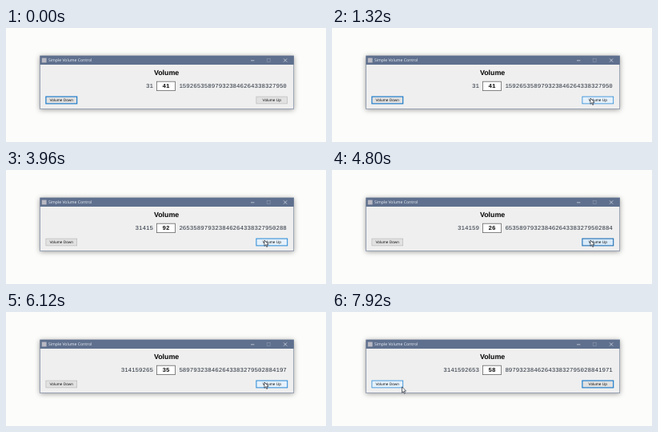
An HTML page that plays this animation: 400x143 px, repeating every 8 s.

```html
<!DOCTYPE html>
<html lang="en">
<head>
<meta charset="utf-8">
<title>Simple Volume Control</title>
<style>
  html, body { margin: 0; width: 100%; height: 100%; overflow: hidden; background: #fcfcfa; }
  svg { display: block; width: 400px; height: 143px; }
  text { text-rendering: geometricPrecision; white-space: pre; }
  .frame { fill: #5f708e; filter: drop-shadow(0 1.5px 3px rgba(0, 0, 0, .38)); }
  .title { font: 5.1px "Open Sans", sans-serif; fill: #eef1f6; }
  .heading { font: bold 8.9px "Liberation Sans", Arial, sans-serif; fill: #050505; text-anchor: middle; }
  .digits { font: 7.48px "Liberation Mono", "Courier New", monospace; fill: #27303c; }
  .value { font-weight: bold; fill: #111; text-anchor: middle; }
  .left { text-anchor: end; }
  .label { font: 4.8px "Liberation Sans", Arial, sans-serif; fill: #151515; text-anchor: middle; }
  .button rect { fill: #e1e1e1; stroke: #b4b4b4; stroke-width: .6; }
  .button.focus rect { stroke: #0f74c8; stroke-width: 1.1; }
  .button.hover rect { fill: #e5f1fb; stroke: #2588d8; stroke-width: .8; }
  .button.focus.hover rect { stroke-width: 1; }
  .button.press rect { fill: #d8eaf9; stroke: #0b62ae; stroke-width: 1; }
  .button.deep rect { fill: #cce4f7; }
  .controls { fill: none; stroke: #e6eaf0; stroke-width: .65; }
</style>
</head>
<body>
<svg viewBox="0 0 400 143">
  <rect class="frame" x="42.3" y="34.6" width="317.6" height="67.2"/>
  <rect x="42.8" y="46" width="316.6" height="55.3" fill="#efefef"/>
  <rect x="44.8" y="37.6" width="5.8" height="5.8" fill="#b9b9c3"/>
  <text class="title" x="53" y="42.3">Simple Volume Control</text>
  <g class="controls">
    <path d="M306 40.8h4.4M347 38.4l4.2 4.2m0-4.2l-4.2 4.2"/>
    <rect x="326.2" y="38.5" width="4" height="4" opacity=".3"/>
  </g>

  <text class="heading" x="200.6" y="58.7">Volume</text>
  <text class="digits left" id="before" x="184" y="74.9"></text>
  <rect x="188.5" y="67.2" width="23" height="11.4" fill="#fff" stroke="#686868" stroke-width=".8"/>
  <text class="digits value" id="value" x="200.1" y="74.9"></text>
  <text class="digits" id="after" x="216.4" y="74.9"></text>

  <g class="button" id="down">
    <rect x="49.9" y="86.1" width="38.8" height="8.8"/>
    <text class="label" x="69.2" y="92.3">Volume Down</text>
  </g>
  <g class="button" id="up">
    <rect x="312.9" y="86.1" width="38.8" height="8.8"/>
    <text class="label" x="332.2" y="92.3">Volume Up</text>
  </g>

  <path id="cursor" d="M0 0V16L3.7 12.6 6.2 18.5 8.6 17.4 6.1 11.7H11Z"
        fill="#fff" stroke="#1c2430" stroke-width="1.5" stroke-linejoin="round"/>
</svg>
<script>
  const LOOP = 8000, STEP = 120;
  const PI = "31415926535897932384626433832795028841971693993751";

  // Mouse presses and releases, in steps.
  const clicks = [[21, 23], [26, 28], [31, 33], [36, 39], [40, 42], [44, 46], [48, 50], [52, 54]];

  // Pointer waypoints: step, x, y.
  const path = [
    [0, 264, 145], [1, 267, 141], [4, 280, 134], [7, 300, 121], [9, 314, 104], [10, 319, 95], [11, 323, 88],
    [54, 323, 88], [55, 318, 87.5], [56, 303, 86], [57, 280, 85], [58, 252.5, 84.5],
    [60, 190, 87], [61, 160, 90], [62, 134, 93], [63, 113, 95.5], [64, 99, 96.5], [65, 91, 95.5], [66, 87.5, 93.8]
  ];

  const el = id => document.getElementById(id);
  const [before, value, after, down, up, cursor] =
    ["before", "value", "after", "down", "up", "cursor"].map(el);

  function pointer(step) {
    const i = Math.max(1, path.findIndex(p => p[0] >= step));
    const [s0, x0, y0] = path[i - 1], [s1, x1, y1] = path[i];
    const k = (step - s0) / (s1 - s0);
    return [x0 + (x1 - x0) * k, y0 + (y1 - y0) * k];
  }

  function over(x, y, left) {
    return x >= left && x <= left + 39.6 && y >= 85.7 && y <= 95.3;
  }

  function setState(button, states) {
    button.setAttribute("class", ["button", ...Object.keys(states).filter(s => states[s])].join(" "));
  }

  function draw(step) {
    const [x, y] = pointer(step);
    const n = 2 + clicks.filter(c => step >= c[1]).length;
    const held = clicks.find(c => step >= c[0] && step < c[1]);
    const used = step >= clicks[0][0];

    before.textContent = PI.slice(0, n);
    value.textContent = PI.slice(n, n + 2);
    after.textContent = PI.slice(n + 1, n + 31);

    setState(down, { focus: !used, hover: over(x, y, 49.5) });
    setState(up, { focus: used, hover: over(x, y, 312.5), press: held, deep: held && step > held[0] });
    cursor.setAttribute("transform", `translate(${x} ${y}) scale(.46)`);
  }

  const start = performance.now();
  function tick() {
    draw(Math.floor((performance.now() - start) % LOOP / STEP));
    requestAnimationFrame(tick);
  }
  tick();
</script>
</body>
</html>
```
